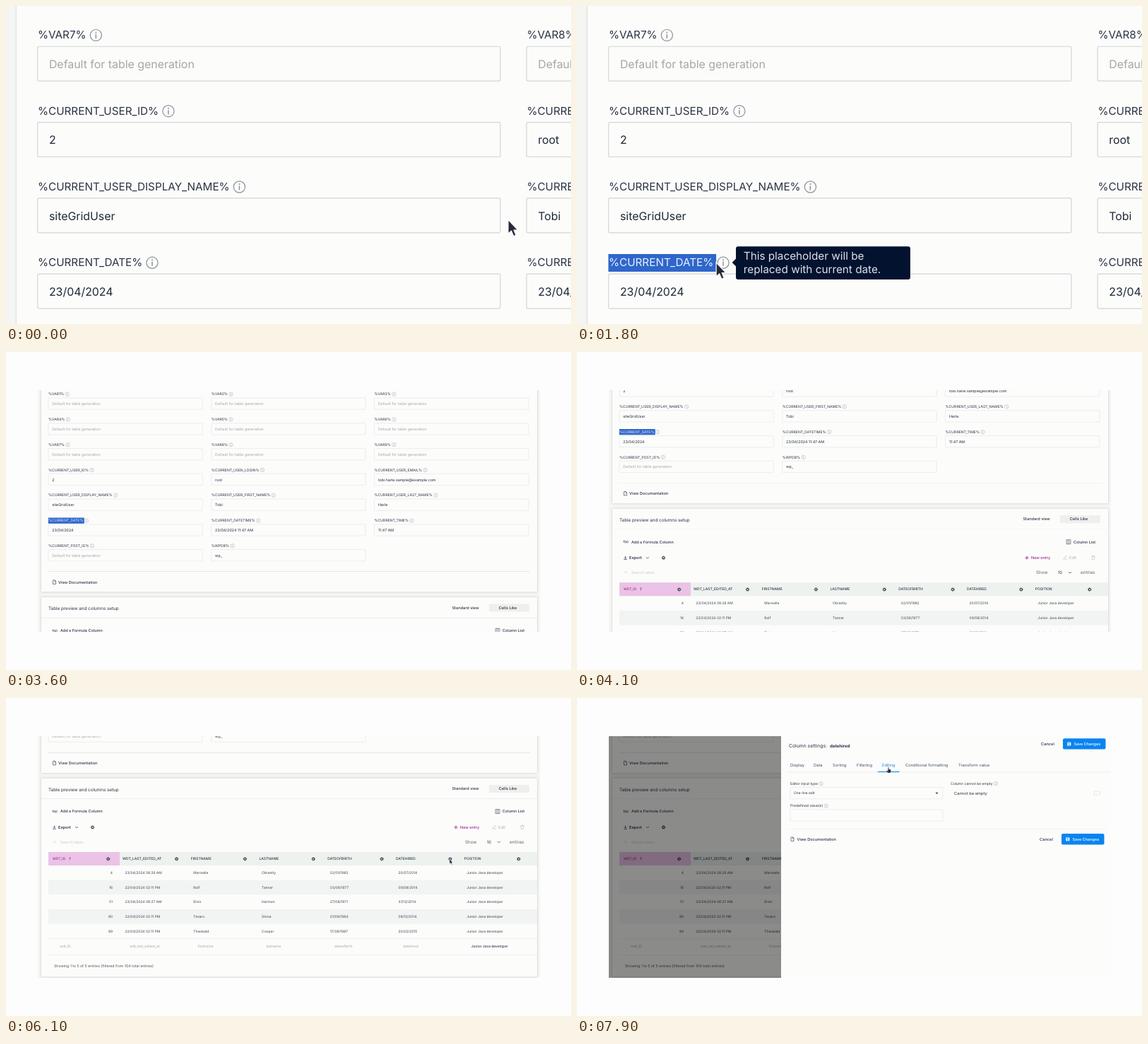
An HTML page with a canvas that plays this animation: 800x450 px, repeating every 8 s.

```html
<!DOCTYPE html>
<html lang="en">
<head>
<meta charset="utf-8">
<title>Column settings</title>
<style>
  html, body { margin: 0; width: 800px; height: 450px; overflow: hidden; background: #fdfdfe; }
  canvas { display: block; }
</style>
</head>
<body>
<canvas id="stage" width="800" height="450"></canvas>
<script>
const ctx = document.getElementById('stage').getContext('2d');
const LOOP = 8000;
const INK = '#2b3344', SOFT = '#a3a7a9', LINE = '#d2d6d7', PAPER = '#fcfcfb', BLUE = '#0a84f0', PINK = '#a0268f';
const WIN = { x: 45, y: 54, w: 711, h: 342 };

const clamp = v => Math.min(1, Math.max(0, v));
const ramp = (t, from, to) => clamp((t - from) / (to - from));
const smooth = u => u * u * (3 - 2 * u);

function rect(x, y, w, h, fill, radius = 0, stroke) {
  ctx.beginPath();
  ctx.roundRect(x, y, w, h, radius);
  if (fill) { ctx.fillStyle = fill; ctx.fill(); }
  if (stroke) { ctx.strokeStyle = stroke; ctx.lineWidth = .4; ctx.stroke(); }
}

function path(d, x, y, stroke, fill, width = .7) {
  const shape = new Path2D(d);
  ctx.save();
  ctx.translate(x, y);
  if (fill) { ctx.fillStyle = fill; ctx.fill(shape); }
  if (stroke) { ctx.strokeStyle = stroke; ctx.lineWidth = width; ctx.stroke(shape); }
  ctx.restore();
}

// Laid out at twice its size: even spacing at every zoom, yet below the optical size of display cuts.
function text(s, x, y, size = 5.1, color = INK, weight = 400, align = 'left') {
  ctx.save();
  ctx.translate(x, y + size * .045);
  ctx.scale(.5, .5);
  ctx.font = `${weight} ${size * 2}px Inter, sans-serif`;
  ctx.textRendering = 'geometricPrecision';
  ctx.textAlign = align;
  ctx.textBaseline = 'middle';
  ctx.fillStyle = color;
  ctx.fillText(s, 0, 0);
  const width = ctx.measureText(s).width / 2;
  ctx.restore();
  return width;
}

function ring(x, y, r, color, width, dash = []) {
  ctx.save();
  ctx.beginPath();
  ctx.arc(x, y, r, 0, 7);
  ctx.strokeStyle = color;
  ctx.lineWidth = width;
  ctx.setLineDash(dash);
  ctx.stroke();
  ctx.restore();
}

function gear(x, y) {
  ring(x, y, 1.5, INK, 1.1);
  ring(x, y, 2.3, INK, .8, [.9, .9]);
}

const chevron = (x, y) => path('M-2-1L0 1L2-1', x, y, INK);
const caret = (x, y) => path('M-2-1H2L0 1.3Z', x, y, null, INK);
const docIcon = (x, y) => path('M-2-2.8H.5L2-1.2V2.8H-2ZM.5-2.8V-1.2H2', x, y, INK, null, .6);

function label(s, x, y, size = 5.1) {
  const end = x + text(s, x, y, size) + 4.6;
  ring(end, y + .1, 2.7, '#8a929a', .4);
  rect(end - .25, y - .4, .5, 2, '#8a929a');
  rect(end - .3, y - 1.5, .6, .6, '#8a929a');
}

const field = (x, y, w = 218.4) => rect(x - .1, y + 5.4, w, 16.3, null, .7, LINE);

// ---------- page ----------
const EMPTY = 'Default for table generation';
const vars = n => [0, 1, 2].map(i => [`VAR${n + i}`, EMPTY]);
const placeholderRows = [
  vars(1), vars(4), vars(7),
  [['CURRENT_USER_ID', '2'], ['CURRENT_USER_LOGIN', 'root'], ['CURRENT_USER_EMAIL', 'tobi.harle.sample@example.com']],
  [['CURRENT_USER_DISPLAY_NAME', 'siteGridUser'], ['CURRENT_USER_FIRST_NAME', 'Tobi'], ['CURRENT_USER_LAST_NAME', 'Harle']],
  [['CURRENT_DATE', '23/04/2024'], ['CURRENT_DATETIME', '23/04/2024 11:47 AM'], ['CURRENT_TIME', '11:47 AM']],
  [['CURRENT_POST_ID', EMPTY], ['WPDB', 'wp_']]
];
const columns = ['wdt_ID', 'wdt_last_edited_at', 'firstname', 'lastname', 'dateofbirth', 'datehired', 'position'];
const people = [
  ['4', '23/04/2024 08:26 AM', 'Marivelle', 'Obrantly', '02/01/1982', '20/07/2014'],
  ['16', '22/04/2024 02:11 PM', 'Rolf', 'Tanner', '03/06/1977', '09/08/2014'],
  ['51', '23/04/2024 08:27 AM', 'Elvin', 'Harmon', '27/08/1971', '31/12/2014'],
  ['80', '22/04/2024 02:11 PM', 'Tevaro', 'Stone', '21/08/1964', '08/10/2014'],
  ['89', '22/04/2024 02:11 PM', 'Theobald', 'Cooper', '17/08/1987', '20/02/2015']
];
const JOB = 'Junior Java developer';
const DATE_Y = 4.8;

function drawCard(y, h) {
  ctx.save();
  ctx.shadowColor = 'rgba(0,0,0,.22)';
  ctx.shadowBlur = 3;
  rect(50, y, 702, h, PAPER, 1);
  ctx.restore();
}

function drawPlaceholders(selection) {
  drawCard(-340, 446);
  placeholderRows.forEach((row, r) => row.forEach(([name, value], c) => {
    const x = 60 + c * 230.8, y = DATE_Y + (r - 5) * 35.77;
    label(`%${name}%`, x, y);
    field(x, y);
    text(value, x + 5.3, y + 13.8, 5.3, value === EMPTY ? SOFT : '#1f2937');
  }));
  if (selection > 0) {
    ctx.save();
    ctx.beginPath();
    ctx.rect(59.8, DATE_Y - 4, selection, 8.3);
    ctx.clip();
    rect(59, DATE_Y - 5, 60, 10, '#2f66cb');
    text('%CURRENT_DATE%', 60, DATE_Y, 5.1, '#e8f0ff');
    ctx.restore();
  }
  rect(60, 77, 682, .4, LINE);
  docIcon(68.5, 92);
  text('View Documentation', 74, 92, 5.6, INK, 500);
}

function drawToolbar() {
  text('Table preview and columns setup', 60, 129.6, 6.3);
  rect(684, 123, 57, 11, '#efefee', 1);
  text('Standard view', 650.5, 128.3, 5.6, INK, 500, 'center');
  text('Cells Like', 710.5, 128.3, 5.6, INK, 500, 'center');
  rect(50, 142.5, 702, .4, '#dfe2e2');
  text('f(x)', 65.5, 160.5, 4.4, INK, 600);
  text('Add a Formula Column', 77, 160.5, 5.5, INK, 500);
  path('M-3-3H3V3H-3ZM-1-3V3M1-3V3', 696, 160.5, INK, null, .5);
  text('Column List', 703, 160.5, 5.5, INK, 500);
  path('M0-2.5V1M-1.6-.6L0 1L1.6-.6M-2.4 2.3H2.4', 68.5, 183, INK);
  text('Export', 74, 183, 5.6, INK, 600);
  chevron(100, 183);
  gear(122.5, 183);
  path('M-2.6 0H2.6M0-2.6V2.6', 637, 183, PINK, null, .9);
  text('New entry', 643, 183, 5.5, PINK, 500);
  path('M-2 2L-1.5 .3L1.5-2.7L2.7-1.5L-.3 1.5ZM.5 2.5H3', 691, 183, '#b4b8bb', null, .6);
  text('Edit', 697, 183, 5.7, '#aeb2b6');
  path('M-2.5-2H2.5M-2-2L-1.5 2.6H1.5L2-2M-.8-2V-3H.8V-2', 731, 183, '#b4b8bb', null, .6);
  ring(69, 203.5, 1.3, '#c9cccc', .5);
  text('Search table...', 77, 204, 5.4, '#c9cccc');
  text('Show', 650, 203.4, 6.2, '#5a626c');
  text('10', 681, 203.6, 5.8);
  chevron(698, 203.8);
  text('entries', 713, 203.4, 6.3, '#5a626c');
}

function drawTable() {
  const colX = c => c ? 165 + (c - 1) * 96.75 : 66;
  rect(60, 218, 692, 19, '#eef2ef');
  rect(60, 218, 101, 19, '#eac3e6');
  columns.forEach((name, c) => {
    text(name.toUpperCase(), colX(c), 227.3, c ? 5 : 4.8, c ? INK : PINK, 500);
    gear(144.7 + c * 96.85, 227.8);
    const last = c === 6;
    text(last ? JOB : name, colX(c) + 10, 351.8, 4.9, last ? INK : SOFT, last ? 500 : 400);
  });
  path('M0 2V-2M-1.3-.8L0-2L1.3-.8', 90.5, 227.5, PINK, null, .6);
  people.forEach((person, r) => {
    const y = 247.3 + r * 20.65;
    if (r % 2) rect(60, y - 10.3, 692, 20.65, '#f1f4f2');
    [...person, JOB].forEach((cell, c) => c
      ? text(cell, colX(c) + 3.6, y, 4.9, '#3c434d')
      : text(cell, 151, y, 4.9, '#3c434d', 400, 'right'));
  });
  rect(60, 340.3, 692, .4, '#e3e6e5');
  rect(60, 363, 692, .4, '#e3e6e5');
  text('Showing 1 to 5 of 5 entries (filtered from 104 total entries)', 68, 379.1, 5.2, '#4c545e');
}

function drawTooltip() {
  const y = DATE_Y - 7.6, dark = '#03122f';
  rect(120, y, 82.3, 15.6, dark, 1);
  path('M0 0L2-2V2Z', 118.2, DATE_Y, null, dark);
  text('This placeholder will be', 123.6, y + 4.5, 5.1, '#dce2ec');
  text('replaced with current date.', 123.6, y + 11, 5.1, '#dce2ec');
}

// ---------- settings panel ----------
const tabs = [['Display', 302], ['Data', 335], ['Sorting', 362], ['Filtering', 396],
  ['Editing', 432], ['Conditional formatting', 465], ['Transform value', 540]];
const displayOptions = [
  ['Displayed header', 'datehired', 'input', 'Column position', '6', 'input'],
  ['Cell content prefix', '', 'input', 'Cell content suffix', '', 'input'],
  ['Hide on mobiles', 'Collapse column on mobile devices', 'toggle', 'Hide on tablets', 'Collapse column on tablet devices', 'toggle'],
  ['CSS class(es)', '', 'input', 'Visible on front-end', 'Show column in front-end', 'toggle'],
  ['Column header alignment', 'Default', 'select', 'Column cells alignment', 'Default', 'select'],
  ['Column color', '', 'input', 'Column header text rotation', 'Default', 'select']
];
const editingOptions = [
  ['Editor input type', 'One-line edit', 'select', 'Column cannot be empty', 'Cannot be empty', 'toggle'],
  ['Predefined value(s)', '', 'input']
];

function option(name, value, kind, x, y) {
  label(name, x, y, 5);
  const toggle = kind === 'toggle';
  text(value, x + 5, y + 13.6, toggle ? 5.75 : 4.85, kind === 'select' && value === 'Default' ? SOFT : INK);
  if (toggle) rect(x + 203, y + 11, 8.5, 5, null, 1, '#c3c7c9');
  else field(x, y, 216);
  if (kind === 'select') caret(x + 207.5, y + 13.7);
}

function buttons(x, y) {
  text('Cancel', x - 31, y, 5.7, INK, 500);
  rect(x, y - 7.7, 60.5, 15.4, BLUE, 2);
  path('M-2.5-2.5H1.5L2.5-1.5V2.5H-2.5Z', x + 8.8, y, null, '#fff');
  rect(x + 7.3, y - 1.7, 2.4, 1.2, BLUE);
  rect(x + 8, y + .4, 1.6, 1.4, BLUE);
  text('Save Changes', x + 15.4, y, 5.5, '#fff', 500);
}

function drawSettings(editing) {
  rect(289, 54, 480, 342, PAPER);
  text('Column settings:', 300, 67.4, 6.8);
  text('datehired', 358, 67.6, 6.1, INK, 700);
  buttons(688, 64.9);
  rect(296, 104.8, 470, .5, '#dcdfe0');
  const active = editing ? 'Editing' : 'Display';
  for (const [name, x] of tabs) {
    const on = name === active;
    const w = text(name, x, 94.9, 5.75, on ? '#1788e0' : '#46536b');
    if (on) rect(x - 6, 103.9, w + 12, 1.1, '#1788e0');
  }
  const rows = editing ? editingOptions : displayOptions;
  rows.forEach((row, r) => {
    const y = r === 5 ? 276.7 : 121 + r * 31.6;
    option(...row.slice(0, 3), 302, y);
    if (row[3]) option(...row.slice(3), 529, y);
  });
  if (!editing) {
    rect(606, 273, 25.5, 9.4, '#a5d68c', 4.7);
    text('NEW', 618.7, 277.5, 4.6, '#55803f', 500, 'center');
  }
  const footer = editing ? 199.7 : 324;
  rect(300, footer - 14.5, 450, .4, LINE);
  docIcon(305, footer);
  text('View Documentation', 311.5, footer, 5.6, INK, 500);
  buttons(686, footer);
}

// ---------- motion ----------
const pointerStops = [
  [0, 282, 346.8], [850, 60, 367], [1000, 60, 367], [1600, 110.7, 367], [2000, 110.7, 367], [2500, 790, 430],
  [4500, 790, 430], [5050, 632.5, 249], [5150, 632.5, 249], [5600, 628, 228], [6800, 628, 228], [7450, 441, 98]
];

function pointerAt(t) {
  let i = 0;
  while (i < pointerStops.length - 2 && t >= pointerStops[i + 1][0]) i++;
  const [from, x0, y0] = pointerStops[i], [to, x1, y1] = pointerStops[i + 1];
  const u = smooth(ramp(t, from, to));
  return [x0 + (x1 - x0) * u, y0 + (y1 - y0) * u];
}

function drawPointer(x, y, hand) {
  const shape = hand
    ? 'M-.8 0H.6V2.6L3.6 3.4V6L2.6 8H-1.2L-3 5L-2.2 4.3L-.8 5.4Z'
    : 'M0 0V6.6L1.5 5.3L2.6 7.8L3.7 7.3L2.7 4.9H4.6Z';
  path(shape, x, y, '#fff', '#262a38', .4);
}

function draw(t) {
  const zoom = 3 - 2 * smooth(ramp(t, 2900, 3100));
  const scroll = -362.2 * (1 - ramp(t, 3200, 5000)) ** 1.74;
  const slide = smooth(ramp(t, 6250, 6602));
  const [px, py] = pointerAt(t);

  ctx.fillStyle = '#fdfdfe';
  ctx.fillRect(0, 0, 800, 450);
  ctx.save();
  ctx.translate(67.5, 369);
  ctx.scale(zoom, zoom);
  ctx.translate(-67.5, -369);
  ctx.beginPath();
  ctx.rect(WIN.x, WIN.y, WIN.w, WIN.h);
  ctx.clip();

  rect(WIN.x, WIN.y, WIN.w, WIN.h, '#f5f5f4');
  ctx.save();
  ctx.translate(0, -scroll);
  drawPlaceholders(t < 1000 ? 0 : t < 1600 ? px - 59.8 : 50.9);
  drawCard(113.5, 281);
  drawToolbar();
  drawTable();
  if (t >= 1600 && t < 2100) drawTooltip();
  ctx.restore();

  rect(WIN.x, WIN.y, WIN.w, WIN.h, `rgba(0,0,0,${.45 * slide})`);
  if (slide > 0) {
    ctx.save();
    ctx.globalAlpha = slide;
    ctx.translate(467 * (1 - slide), 0);
    drawSettings(t >= 7600);
    ctx.restore();
  }
  drawPointer(px, py, t > 7350);
  ctx.restore();
}

function tick() {
  draw(performance.now() % LOOP);
  requestAnimationFrame(tick);
}
tick();
</script>
</body>
</html>
```
